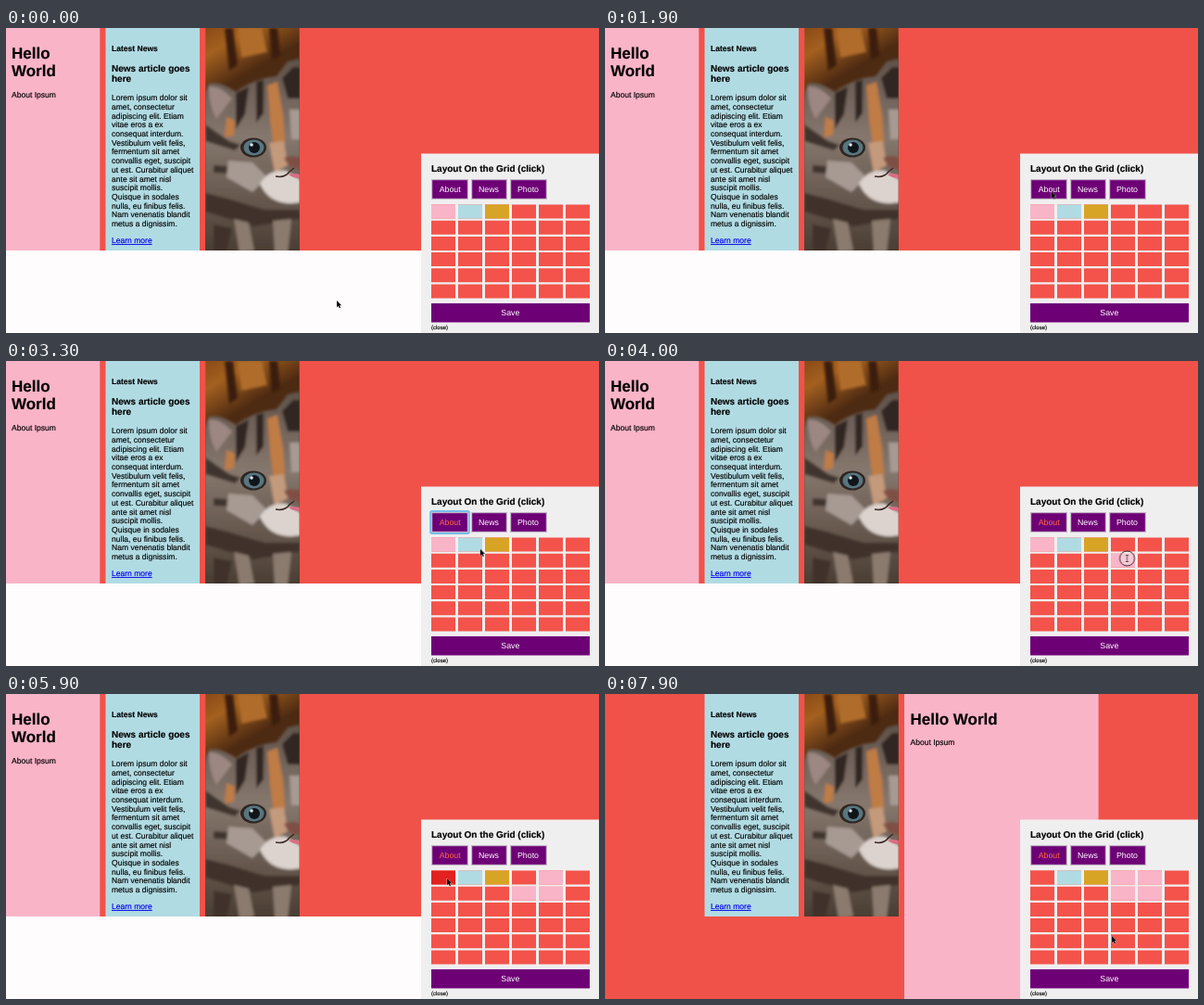
An HTML page for the animation above (8000 ms loop, 640 by 329 pixels).

```html
<!DOCTYPE html>
<html lang="en">
<head>
<meta charset="utf-8">
<title>Layout on the grid</title>
<style>
  html, body { margin: 0; width: 100%; height: 100%; overflow: hidden; background: #f05249; }
  svg { display: block; width: 640px; height: 329px; font: 8.55px "Liberation Sans", Arial, sans-serif; text-rendering: geometricPrecision; }
  text { stroke: #000; stroke-width: .15; }
  .h1 { font-size: 17px; font-weight: bold; }
  .h3 { font-size: 10px; font-weight: bold; }
  .bold { font-weight: bold; }
  .link { fill: #00e; stroke: #00e; text-decoration: underline; }
  .pink { fill: #fab4c8; }
  .button { fill: #6e0076; stroke: #c4b6c6; stroke-width: 1.2; }
  .label { fill: #fff; stroke: none; font-size: 8.8px; }
  .label text { stroke: none; }

  /* Every timeline shares one 8 s loop; states jump, the pointer glides. */
  .step { animation: 8s step-end infinite; }
  .before { animation-name: before; }
  .after { animation-name: after; }
  .about { animation-name: about; }
  .focus { animation-name: focus; }
  .first { animation-name: first; }
  .cell-a { animation-name: cell-a; }
  .cell-b { animation-name: cell-b; }
  .cell-c { animation-name: cell-c; }
  .cell-d { animation-name: cell-d; }
  .save { animation-name: save; }
  .arrow { animation-name: arrow; }
  .beam { animation-name: beam; }
  .ring { animation-name: ring; }
  .pointer { animation: glide 8s ease-in-out infinite; }

  @keyframes before { 0% { visibility: visible } 91.25% { visibility: hidden } }
  @keyframes after { 0% { visibility: hidden } 91.25% { visibility: visible } }
  @keyframes about { 0% { fill: #fff } 26.25% { fill: #ff6a45 } }
  @keyframes focus { 0%, 48.75% { visibility: hidden } 26.25% { visibility: visible } }
  @keyframes first {
    0%, 18.75%, 38.75% { fill: #fab4c8 }
    12.5%, 32.5% { fill: #f28cc4 }
    70% { fill: #e2221f }
    76.25% { fill: #f3534a }
  }
  @keyframes cell-a { 0% { visibility: hidden } 48.75% { visibility: visible } }
  @keyframes cell-b { 0% { visibility: hidden } 57.5% { visibility: visible } }
  @keyframes cell-c { 0% { visibility: hidden } 65% { visibility: visible } }
  @keyframes cell-d { 0% { visibility: hidden } 81.25% { visibility: visible } }
  @keyframes save { 0%, 92.5% { fill: #6e0076 } 86.25% { fill: #46004d } }
  @keyframes arrow {
    0%, 67.5%, 83.75%, 92.5% { visibility: visible }
    45%, 78.75%, 86.25% { visibility: hidden }
  }
  @keyframes beam {
    0%, 67.5%, 83.75%, 92.5% { visibility: hidden }
    45%, 78.75%, 86.25% { visibility: visible }
  }
  @keyframes ring {
    0%, 28.75%, 52.5%, 60%, 66.25%, 72.5%, 82.5%, 91.25% { visibility: hidden }
    26.25%, 48.75%, 57.5%, 65%, 70%, 81.25%, 90% { visibility: visible }
  }
  @keyframes glide {
    0%, 5% { transform: translate(357px, 294px) }
    13.75%, 17.5% { transform: translate(478px, 199.5px) }
    25%, 28.75% { transform: translate(482px, 175px) }
    32.5%, 37.5% { transform: translate(480px, 196.5px) }
    46.25%, 52.5% { transform: translate(563.5px, 213px) }
    56.25%, 60% { transform: translate(590px, 214px) }
    63%, 66% { transform: translate(590px, 198px) }
    70%, 75.5% { transform: translate(476px, 199px) }
    80%, 83% { transform: translate(560px, 198px) }
    87.5%, 91.25% { transform: translate(543px, 307px) }
    97.5%, 100% { transform: translate(547px, 261px) }
  }
</style>
</head>
<body>
<svg viewBox="0 0 640 329">
  <defs>
    <clipPath id="frame"><path d="M215.3 0h101.400v240h-101.400z"/></clipPath>
    <filter id="soft" x="-20%" y="-20%" width="140%" height="140%"><feGaussianBlur stdDeviation="1.8"/></filter>
    <linearGradient id="wood" x2=".25" y2="1">
      <stop stop-color="#8a4a16"/><stop offset=".12" stop-color="#a3601f"/><stop offset=".3" stop-color="#4d2a12"/>
    </linearGradient>
    <linearGradient id="fur" x2="0" y2="1">
      <stop stop-color="#5d5048"/><stop offset=".4" stop-color="#85776d"/>
      <stop offset=".65" stop-color="#6b5d53"/><stop offset="1" stop-color="#46392f"/>
    </linearGradient>
  </defs>

  <path fill="#f05249" d="M0 0h640v329H0z"/>

  <g class="step before">
    <path fill="#fefcfd" d="M0 240h640v89H0z"/>
    <path class="pink" d="M0 0h101.300v240H0z"/>
    <text class="h1" x="6" y="32.500">Hello<tspan x="6" dy="19.500">World</tspan></text>
    <text x="6" y="75">About Ipsum</text>
  </g>

  <g class="step after">
    <path class="pink" d="M323 0h209.600v329H323z"/>
    <text class="h1" x="329.500" y="32.500">Hello World</text>
    <text x="329.500" y="55.300">About Ipsum</text>
  </g>

  <path fill="#b1dbe3" d="M107.500 0h101.500v240H107.500z"/>
  <text class="bold" x="114" y="24.500">Latest News</text>
  <text class="h3" x="114" y="46.700">News article goes<tspan x="114" dy="11.300">here</tspan></text>
  <text x="114" y="78.200">Lorem ipsum dolor sit
    <tspan x="114" dy="9.71">amet, consectetur</tspan>
    <tspan x="114" dy="9.71">adipiscing elit. Etiam</tspan>
    <tspan x="114" dy="9.71">vitae eros a ex</tspan>
    <tspan x="114" dy="9.71">consequat interdum.</tspan>
    <tspan x="114" dy="9.71">Vestibulum velit felis,</tspan>
    <tspan x="114" dy="9.71">fermentum sit amet</tspan>
    <tspan x="114" dy="9.71">convallis eget, suscipit</tspan>
    <tspan x="114" dy="9.71">ut est. Curabitur aliquet</tspan>
    <tspan x="114" dy="9.71">ante sit amet nisl</tspan>
    <tspan x="114" dy="9.71">suscipit mollis.</tspan>
    <tspan x="114" dy="9.71">Quisque in sodales</tspan>
    <tspan x="114" dy="9.71">nulla, eu finibus felis.</tspan>
    <tspan x="114" dy="9.71">Nam venenatis blandit</tspan>
    <tspan x="114" dy="9.71">metus a dignissim.</tspan>
  </text>
  <text class="link" x="114" y="232">Learn more</text>

  <!-- Kitten photo -->
  <g clip-path="url(#frame)">
    <path fill="url(#wood)" d="M215 0h102v240H215z"/>
    <g filter="url(#soft)">
      <path fill="#3a1d0a" d="M236 0h9l5 40-9 6zM284 0h9l3 30-9 4z"/>
      <path fill="#b06c2c" d="M250 0h26l6 26-28 6z"/>
      <path fill="url(#fur)" d="M205 92L219 60Q232 57 248 69Q268 54 292 52L304 36L330 30V250H205Z"/>
      <path fill="#9c8782" d="M219 63q13-1 25 13l-17 22q-9-17-8-35z"/>
      <path fill="#332822" d="M248 70l14-7-4 30-10 16zM270 58l8-2 0 36-8 10zM298 54l12-12 8 0v34l-14 0z"/>
      <path fill="#c07c45" d="M282 62l11-4 6 36 2 30-12 4-4-30zM238 96l9 4-1 16-10 2z"/>
      <path fill="#3f342e" d="M215 104l26 18 12 4-6 6-32-10zM224 148l28 2 10 8-38-2z"/>
      <path fill="#a69a93" d="M240 143l26 2 16 16-16 16-28-16zM306 88h12v32h-10z"/>
      <path fill="#c49a7c" d="M284 124l16-2 4 26-14 8z"/>
      <path fill="#ddd3ce" d="M274 168q10-16 28-14l16 10v24q-32 6-44-20z"/>
      <path fill="#40332b" d="M215 178l24 6 40 12 38 0v10l-50 8-52-16zM224 212l20 4-6 26h-14z"/>
      <path fill="#8b7a6e" d="M246 206l16 4 6 30-16 2zM288 208l20-2-4 36-14 0z"/>
      <path fill="#7f4f45" d="M300 140q10-4 18 0v12q-12 2-18-12z"/>
    </g>
    <ellipse cx="267" cy="129" rx="14" ry="10.500" fill="#2f2622"/>
    <ellipse cx="267.500" cy="129" rx="11" ry="8.500" fill="#587680"/>
    <circle cx="268" cy="129" r="6" fill="#10151a"/>
    <circle cx="265" cy="126" r="1.800" fill="#dce8ec"/>
    <path fill="none" stroke="#3a2824" stroke-width="1.500" d="M291 160q10 2 15-5l5-4"/>
    <path fill="#d96d83" d="M305 158q6-2 12 0v4q-7 0-12-4z"/>
  </g>

  <!-- Layout panel -->
  <path fill="#f0eff0" d="M448 135.500h192V329H448z"/>
  <text class="h3" x="459" y="154.700">Layout On the Grid (click)</text>
  <rect class="step focus" x="458.300" y="162.300" width="41.400" height="23.400" rx="1.500" fill="none" stroke="#78bdea" stroke-width="2.400"/>
  <rect class="button" x="459.600" y="163.600" width="38.800" height="20.800"/>
  <rect class="button" x="502.600" y="163.600" width="37.800" height="20.800"/>
  <rect class="button" x="544.600" y="163.600" width="38.800" height="20.800"/>
  <g class="label">
    <text class="step about" x="467.700" y="177">About</text>
    <text x="510" y="177">News</text>
    <text x="552" y="177">Photo</text>
  </g>

  <path fill="none" stroke="#f3534a" stroke-width="15" stroke-dasharray="26 3"
    d="M459 198h171M459 215.200h171M459 232.400h171M459 249.600h171M459 266.800h171M459 284h171"/>
  <path class="step first" d="M459 190.500h26v15h-26z"/>
  <path fill="#b1dbe3" d="M488 190.500h26v15h-26z"/>
  <path fill="#d7a425" d="M517 190.500h26v15h-26z"/>
  <g class="pink">
    <path class="step cell-a" d="M546 207.700h26v15h-26z"/>
    <path class="step cell-b" d="M575 207.700h26v15h-26z"/>
    <path class="step cell-c" d="M575 190.500h26v15h-26z"/>
    <path class="step cell-d" d="M546 190.500h26v15h-26z"/>
  </g>

  <path class="step save" d="M459 297h171v20.500H459z"/>
  <text class="label" x="544.300" y="310.300" text-anchor="middle">Save</text>
  <text x="459" y="325.300" font-size="6">(close)</text>

  <g class="pointer">
    <circle class="step ring" r="8" fill="#fff" fill-opacity=".25" stroke="#222" stroke-width=".9"/>
    <path class="step arrow" d="M0 0V7.200L1.700 5.700 2.800 8.200 4 7.700 2.900 5.200H5.200Z" stroke="#fff" stroke-width=".6" paint-order="stroke"/>
    <g class="step beam" fill="none">
      <path stroke="#fff" stroke-opacity=".7" stroke-width="1.800" d="M-1.500-3.500h3M0-3.500v7M-1.500 3.500h3"/>
      <path stroke="#111" stroke-width=".8" d="M-1.500-3.500h3M0-3.500v7M-1.500 3.500h3"/>
    </g>
  </g>
</svg>
</body>
</html>
```
